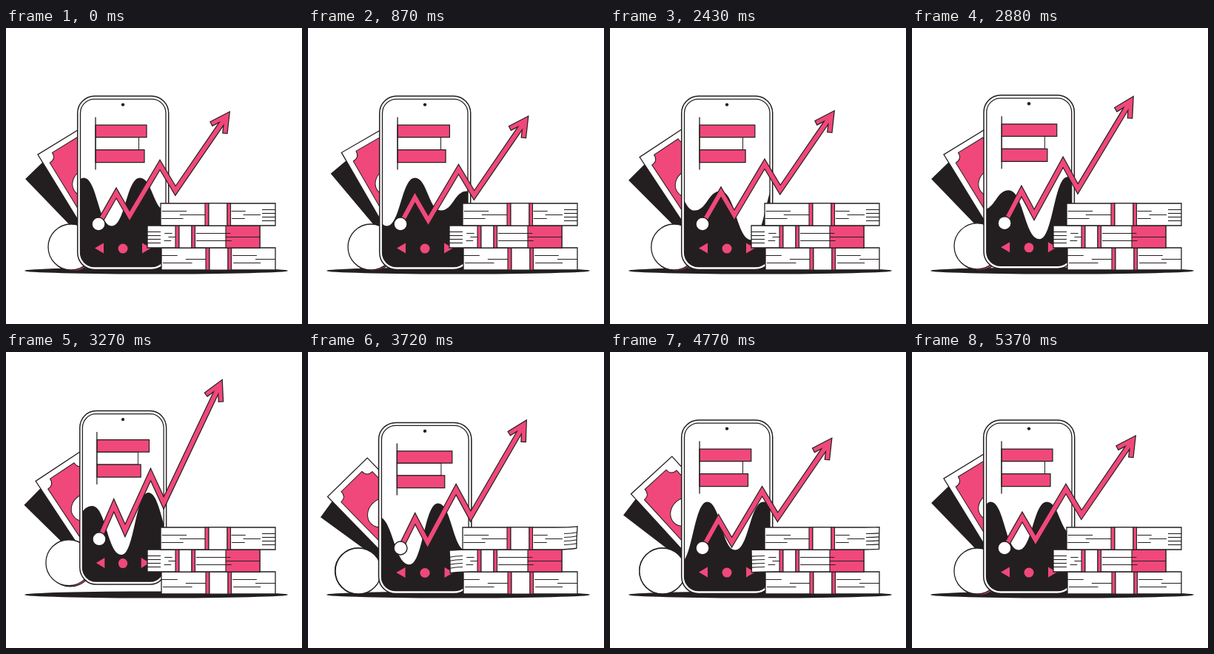
Write an HTML page with a canvas that moves like this. It is 400 px wide and 400 px high and loops after 5400 ms.

```html
<!DOCTYPE html>
<html>
<head>
<meta charset="utf-8">
<style>
html, body { margin: 0; width: 100%; height: 100%; overflow: hidden; background: #fff; }
canvas { display: block; width: 400px; height: 400px; }
</style>
</head>
<body>
<canvas id="stage" width="400" height="400"></canvas>
<script>
const c = document.getElementById('stage').getContext('2d');
const LOOP = 5400, PINK = '#f0487a', DARK = '#231f20', WHITE = '#fff';
const RAD = Math.PI / 180;

function ease(t, from, to) {
  const p = Math.min(1, Math.max(0, (t - from) / (to - from)));
  return p * p * (3 - 2 * p);
}
// Swells from 0 to 1 at the peak and back to 0
const pulse = (t, from, peak, to) => ease(t, from, peak) - ease(t, peak, to);

function paint(fill, line = 1.3) {
  if (fill) { c.fillStyle = fill; c.fill(); }
  if (line) { c.strokeStyle = DARK; c.lineWidth = line; c.stroke(); }
}
function box(x, y, w, h, fill, line) {
  c.beginPath(); c.rect(x, y, w, h); paint(fill, line);
}
function round(x, y, w, h, r, fill, line) {
  c.beginPath(); c.roundRect(x, y, w, h, r); paint(fill, line);
}
function oval(x, y, rx, ry, fill, line) {
  c.beginPath(); c.ellipse(x, y, rx, ry, 0, 0, 7); paint(fill, line);
}
function triangle(x, y, dir) {
  c.beginPath();
  c.moveTo(x + 6 * dir, y);
  c.lineTo(x - 6 * dir, y - 7);
  c.lineTo(x - 6 * dir, y + 7);
  paint(PINK, 0);
}

// Turns around a pivot, with the note's left corner as origin
function note(px, py, turn, x, y, angle, draw) {
  c.save();
  c.translate(px, py);
  c.rotate(-turn * RAD);
  c.translate(x - px, y - py);
  c.rotate(angle * RAD);
  draw();
  c.restore();
}

function drawNotes(m) {
  note(132, 266, -4 * m.dip + 3 * m.lift + 16 * m.kick, 27, 204, 46,
    () => box(0, -65, 115, 65, DARK));
  note(144, 257, -1.5 * m.dip + 6.2 * m.lift + 20.5 * m.kick, 43, 171, 58.5, () => {
    const w = 75, inset = 8, notch = 10;
    box(0, -w, 115, w, WHITE);
    c.beginPath();
    c.moveTo(inset, -inset - notch);
    c.quadraticCurveTo(inset + notch, -inset - notch, inset + notch, -inset);
    c.lineTo(110, -inset);
    c.lineTo(110, inset - w);
    c.lineTo(inset + notch, inset - w);
    c.quadraticCurveTo(inset + notch, inset + notch - w, inset, inset + notch - w);
    c.closePath();
    paint(PINK, 1);
    oval(67, -w / 2, 18, 21, WHITE, 1);
  });
}

function drawCoin(m) {
  const x = 88 - 3 * m.dip - 4 * m.lift - 32 * m.kick, y = 296 - 12 * m.hop;
  const side = (x - 72) / 16;
  oval(x + 2.4 * side, y + Math.max(0, side) * 1.5, 31, 31, PINK);
  oval(x, y, 31, 31, WHITE);
}

// Crests and troughs of one stretch of the rolling wave
const CURVE = [[105, 203], [143, 268], [181, 203], [216, 247], [251, 221], [293, 287]];
const SPAN = 226;

function drawWave(t) {
  const shift = SPAN * t / LOOP;
  let lx = -400, ly = 250;
  c.beginPath();
  c.moveTo(lx, 330);
  c.lineTo(lx, ly);
  for (let k = -1; k < 2; k++) for (const [cx, y] of CURVE) {
    const x = cx + k * SPAN - shift, reach = (x - lx) * .48;
    c.bezierCurveTo(lx + reach, ly, x - reach, y, x, y);
    lx = x; ly = y;
  }
  c.lineTo(lx, 330);
  paint(DARK, 0);
}

function drawPhone(t, m) {
  c.save();
  c.translate(158, 326.6 - 13.3 * m.hop);
  c.scale(1 - .053 * m.hop + .02 * m.land, 1 - .015 * m.land);
  c.translate(-158, -327);

  round(96.7, 92.5, 123, 234.5, 23, WHITE, 1.5);
  c.save();
  round(100.5, 96.5, 115.5, 226.5, 19, WHITE, 0);
  c.clip();
  drawWave(t);
  c.restore();
  round(100.5, 96.5, 115.5, 226.5, 19, null);
  oval(158, 104, 2.2, 2.2, DARK, 0);

  const sway = Math.cos(2 * Math.PI * t / LOOP);
  box(121, 148, 58.5 - 16 * m.shrink, 17, WHITE, 1);
  box(121, 131.5, 72 - 25 * m.shrink - 3 * sway, 16.5, PINK, 1.2);
  box(121, 165, 64 - 23 * m.shrink + 2 * sway, 17, PINK, 1.2);
  box(121, 121, 0, 71);

  triangle(126, 298, -1);
  triangle(190, 298, 1);
  oval(158, 298.5, 6.5, 6.5, PINK, 0);
  c.restore();
}

const noise = n => Math.abs(Math.sin(n * 12.9898) * 43758.5453) % 1;

// Short page lines, alternately touching the left and right side
function pages(x1, x2, y, seed) {
  c.beginPath();
  for (let i = 0; i < 3; i++) {
    const len = (x2 - x1) * (.35 + .35 * noise(seed + i));
    const x = i % 2 ? x2 - len : x1 + 3 * noise(seed - i);
    c.moveTo(x, y + 10.5 + i * 5);
    c.lineTo(x + len, y + 10.5 + i * 5);
  }
  paint(null, 1.1);
}

// A bundle of notes; the loose end on one side (-1 left, 1 right) curls by bend
function bundle(x1, x2, y, band, gap, side, bend) {
  const h = 30, loose = side !== 0;
  const [end, far] = side > 0 ? [x2, x1] : [x1, x2];
  const root = end - side * 30, mid = end - side * 12, lift = side * bend;
  const right = band + gap + 9.5;
  c.beginPath();
  c.moveTo(far, y);
  c.lineTo(root, y);
  c.quadraticCurveTo(mid, y, end, y - lift);
  c.quadraticCurveTo(end - lift, y + h / 2, end - side * bend, y + h - lift * 1.5);
  c.quadraticCurveTo(mid, y + h, root, y + h);
  c.lineTo(far, y + h);
  c.closePath();
  paint(WHITE);

  if (side < 0) box(x2 - 46, y, 46, h, PINK, 1.1);
  pages(side < 0 ? x1 + 21 : x1, band, y, y);
  pages(right, side > 0 ? x2 - 20 : x2, y, y + 7);
  if (loose) for (let i = 0; i < 4; i++) {
    const ly = y + 8.5 + i * 5;
    c.beginPath();
    c.moveTo(end - side * 18, ly);
    c.quadraticCurveTo(end - side * 8, ly, end - side * bend * .6, ly - lift * 1.5);
    paint(null, 1.1);
  }
  box(band, y, 5, h, PINK, 1.1);
  box(band + 5, y, gap, h, WHITE, 1.1);
  box(band + 5 + gap, y, 4.5, h, PINK, 1.1);
}

function drawStack(m) {
  bundle(210, 364, 297, 270, 25, 0, 0);
  bundle(191, 343, 267, 229, 17, -1, 2 * m.curl);
  bundle(209, 364, 237, 269, 25, 1, 2 * m.curl);
}

// Joints of the line, measured from the dot
const JOINTS = [[24, -42], [42, -11], [83, -80], [104, -45], [178, -153]];

function drawArrow(m) {
  const drop = m.dip - .67 * m.lift + m.kick;
  const x0 = 125 + m.hop, y0 = 265 - 13 * m.hop;
  const pts = JOINTS.map(([x, y]) => [
    x0 + x * (1 - .16 * m.leap) - 4.5 * drop,
    y0 + y * (1 + .1 * m.leap) + 6 * drop
  ]);
  const [px, py] = pts[3], tip = pts[4];
  tip[0] += 17.5 * m.leap;
  tip[1] -= 50 * m.leap;
  const [tx, ty] = tip;
  const len = Math.hypot(tx - px, ty - py), ux = (tx - px) / len, uy = (ty - py) / len;
  const at = (a, b) => [tx + ux * a - uy * b, ty + uy * a + ux * b];
  pts[4] = at(-11, 0);
  pts.unshift([x0, y0]);

  const trace = (color, shaft, head, extra) => {
    const path = (width, points) => {
      c.strokeStyle = color;
      c.lineWidth = width;
      c.beginPath();
      points.forEach(p => c.lineTo(...p));
      c.stroke();
    };
    path(shaft, pts);
    path(head, [-1, 1, 0].slice(0, 2).flatMap(s =>
      s < 0 ? [at(-28.5 - extra, -11 - extra / 2), at(-8, 0)] : [at(-28.5 - extra, 11 + extra / 2)]));
  };
  trace(DARK, 8.2, 7.6, 1);
  trace(PINK, 5.8, 5.2, 0);
  oval(x0, y0, 9, 9, WHITE, 1.4);
}

function draw(t) {
  const m = {
    dip: pulse(t, 0, 870, 1740),
    lift: pulse(t, 870, 1740, 2850),
    shrink: pulse(t, 900, 1740, 2430),
    hop: pulse(t, 2800, 3220, 3560),
    leap: pulse(t, 2700, 3200, 4100),
    land: pulse(t, 3560, 3680, 4000),
    kick: pulse(t, 3050, 4200, LOOP),
    curl: pulse(t, 3370, 4000, 5110)
  };
  c.fillStyle = WHITE;
  c.fillRect(0, 0, 400, 400);
  oval(203, 328, 178, 4.6, DARK, 0);
  drawNotes(m);
  drawCoin(m);
  drawPhone(t, m);
  drawStack(m);
  drawArrow(m);
}

const start = performance.now();
function tick() {
  draw((performance.now() - start) % LOOP);
  requestAnimationFrame(tick);
}
tick();
</script>
</body>
</html>
```
